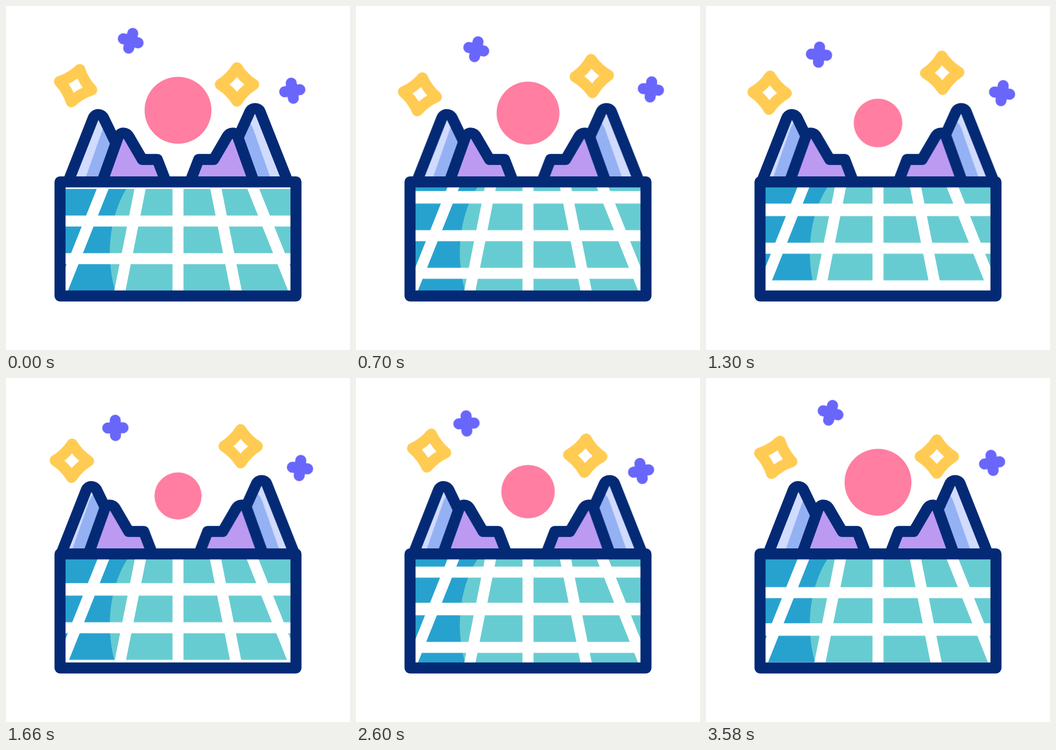
An HTML page for the animation above (3600 ms loop, 640 by 640 pixels).

```html
<!DOCTYPE html>
<html lang="en">
<head>
<meta charset="utf-8">
<title>Mountain sunrise</title>
<style>
  html, body { margin: 0; width: 100%; height: 100%; overflow: hidden; background: #fff; }
  svg { display: block; width: 100vw; height: 100vh; }
  .line { fill: none; stroke: #042a76; stroke-width: 20.5; stroke-linejoin: round; }
  .tiles { fill: none; stroke: #fff; stroke-width: 20.5; }
  .spark { fill: none; stroke-width: 20.5; stroke-linejoin: round; stroke-linecap: round; }
  .star { stroke: #ffcb52; }
  .plus { stroke: #6966fb; }
  .slide { animation: slide 3.6s infinite; }
  .sun { animation: sun 3.6s infinite; }
  .flow { animation: flow 3.6s linear infinite; }
  .slide, .sun { animation-timing-function: cubic-bezier(.72, 0, .28, 1); }
  @keyframes slide {
    0%, 100% { transform: translateX(0); }
    50% { transform: translateX(var(--d)); }
  }
  @keyframes sun {
    0%, 100% { transform: translate(320px, 194px) scale(1); }
    50% { transform: translate(320px, 219.6px) scale(.703); }
  }
  @keyframes flow {
    from { transform: translateY(0); }
    to { transform: translateY(140px); }
  }
</style>
</head>
<body>
<svg viewBox="0 0 640 640">
  <defs>
    <path id="backL" d="M115.6 327L162 209C165.5 200 177 199.500 181.500 208L239 327"/>
    <path id="backR" d="M524.400 327L473 197C469.500 188.500 457.500 188.500 453.500 197L394.600 327"/>
    <path id="front" d="M178.800 327L208.500 244C212 234.500 223.500 233.500 229 243.500L253.500 285.500H281.500L297.500 327"/>
    <path id="shade" d="M145.500 327L180 229Q183 221 188 216H240V327Z"/>
    <clipPath id="clipL"><use href="#backL"/></clipPath>
    <clipPath id="clipR"><use href="#backR"/></clipPath>
    <clipPath id="floor"><path d="M105 332H535V535H105Z"/></clipPath>
  </defs>

  <circle class="sun" r="62.2" fill="#ff7ea1"/>

  <g class="slide" style="--d:-13px">
    <use href="#backL" fill="#d1dbfd"/>
    <g clip-path="url(#clipL)">
      <use href="#shade" class="slide" style="--d:-12.3px" fill="#94b1f3"/>
    </g>
    <use href="#backL" class="line"/>
  </g>
  <g class="slide" style="--d:12.2px">
    <use href="#backR" fill="#d1dbfd"/>
    <g clip-path="url(#clipR)">
      <g transform="matrix(-1 0 0 1 640 0)">
        <use href="#shade" class="slide" style="--d:-4.6px" fill="#94b1f3"/>
      </g>
    </g>
    <use href="#backR" class="line"/>
  </g>

  <g class="slide" style="--d:-25.3px">
    <use href="#front" fill="#bc9af2"/>
    <use href="#front" class="line"/>
  </g>
  <g transform="matrix(-1 0 0 1 640 0)">
    <g class="slide" style="--d:-16.8px">
      <use href="#front" fill="#bc9af2"/>
      <use href="#front" class="line"/>
    </g>
  </g>

  <g clip-path="url(#floor)">
    <path fill="#67ccd1" d="M105 332H535V535H105Z"/>
    <path fill="#27a2cf" d="M105 332H229L226 337C197 381 182 455 203 530L204 535H105Z"/>
    <path class="tiles" d="M320 330V540M251.500 330L209.800 540M388.500 330L430.200 540M184 330L100 540M456 330L540 540"/>
    <path class="tiles flow" d="M100 260H540M100 327.200H540M100 330H540M100 400H540M100 470H540"/>
  </g>
  <rect class="line" x="100.500" y="327.200" width="439" height="212.400"/>

  <g id="sparks"></g>
</svg>
<script>
  const LOOP = 3600, STEPS = 72;
  const times = [0, 420, 980, 1660, 2170, 2600, 3060];
  const star = 'M0-31Q12-12 31 0Q12 12 0 31Q-12 12-31 0Q-12-12 0-31Z';
  const plus = 'M0-14.300V14.300M-14.300 0H14.300';

  const sparks = [
    { kind: 'star', d: star,
      x: [129.5, 122.5, 117, 122.5, 130.5, 136, 136.7],
      y: [148.2, 160.5, 165, 154, 142, 135, 135.5],
      r: [14.5, 12.5, 4.5, 1, 3, 7.5, 11.5] },
    { kind: 'star', d: star,
      x: [429.7, 435.8, 440.2, 436.6, 431, 426.5, 424.4],
      y: [146, 137, 125.3, 127, 137, 144.5, 148.5],
      r: [0, -2, -2.5, 0, 2, 3, 1.5] },
    { kind: 'plus', d: plus,
      x: [232, 229, 217.5, 203.5, 200, 205.5, 216.5],
      y: [64.7, 74, 86, 92.8, 89.8, 84.5, 76],
      r: [15.5, 16, 9.5, -1, -4, -3, 2] },
    { kind: 'plus', d: plus,
      x: [532.6, 543.5, 551.5, 547, 538.7, 530.4, 526.7],
      y: [157.6, 154.4, 157.6, 167.5, 172.3, 173, 168.7],
      r: [-8, 2, 8, 6, -3, -9, -12] }
  ];

  // Smooth closed curve through the values at the given times.
  function curve(v, t) {
    const n = times.length;
    const at = i => times[(i + n) % n] + LOOP * Math.floor(i / n);
    const val = i => v[(i + n) % n];
    const rate = i => (val(i + 1) - val(i)) / (at(i + 1) - at(i));
    const slope = i => {
      const a = at(i) - at(i - 1), b = at(i + 1) - at(i);
      return (rate(i - 1) * b + rate(i) * a) / (a + b);
    };
    let i = 0;
    while (at(i + 1) <= t) i++;
    const h = at(i + 1) - at(i), u = (t - at(i)) / h, w = 1 - u;
    return w * w * (1 + 2 * u) * val(i) + u * u * (3 - 2 * u) * val(i + 1)
      + h * u * w * (w * slope(i) - u * slope(i + 1));
  }

  const pose = (s, t) =>
    `translate(${curve(s.x, t)}px, ${curve(s.y, t)}px) rotate(${curve(s.r, t)}deg)`;

  for (const s of sparks) {
    const el = document.createElementNS('http://www.w3.org/2000/svg', 'path');
    el.setAttribute('d', s.d);
    el.setAttribute('class', 'spark ' + s.kind);
    document.getElementById('sparks').append(el);
    const frames = Array.from({ length: STEPS + 1 }, (_, k) =>
      ({ transform: pose(s, (k % STEPS) * LOOP / STEPS) }));
    el.animate(frames, { duration: LOOP, iterations: Infinity });
  }
</script>
</body>
</html>
```
